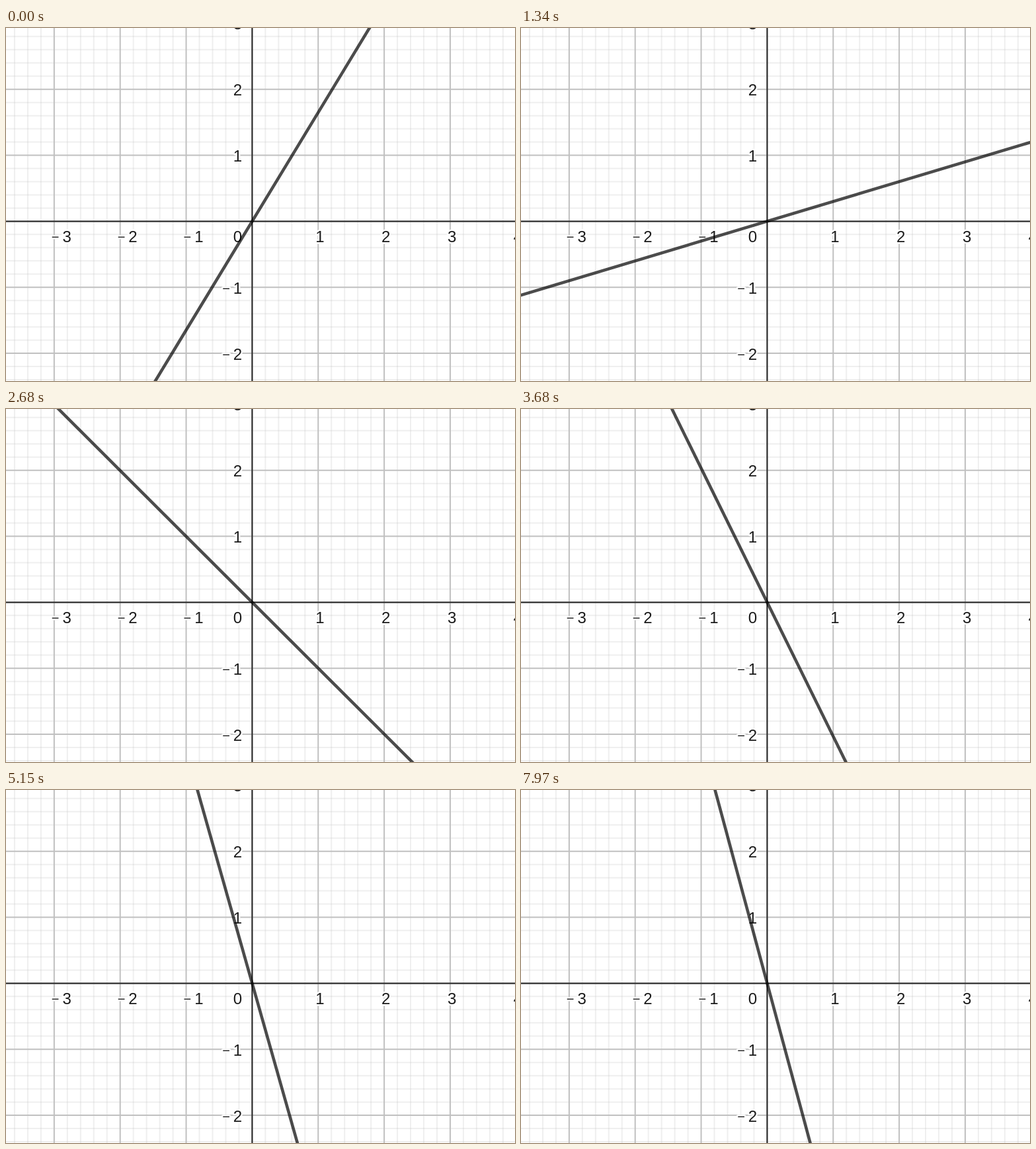
These frames come from a looping animation (770x534 px, 8 s). An HTML page:

```html
<!DOCTYPE html>
<html lang="en">
<head>
<meta charset="utf-8">
<title>Rotating line through the origin</title>
<style>
  html, body { margin: 0; width: 100%; height: 100%; overflow: hidden; background: #fff; }
  svg { display: block; width: 770px; height: 534px; }
  .minor { stroke: #c0c0c0; stroke-opacity: .25; stroke-width: 2; }
  .major { stroke: #c0c0c0; stroke-width: 2; }
  .axis { stroke: #252525; stroke-width: 2; }
  #graph { stroke: #000; stroke-opacity: .7; stroke-width: 4.6; }
  text {
    font: 24px "Liberation Sans", Arial, sans-serif;
    text-anchor: middle;
    fill: #1c1c1c;
    stroke: #fff;
    stroke-width: 5;
    stroke-linejoin: round;
    paint-order: stroke;
  }
  .sign { font-size: 20px; }
</style>
</head>
<body>
<svg viewBox="0 0 770 534">
  <g id="grid"></g>
  <g id="labels"></g>
  <line id="graph"/>
</svg>
<script>
const W = 770, H = 534, OX = 372.4, OY = 292.4, UNIT = 99.85;
const LOOP = 8000, TICK = 66.75;

// [tick, slope]; the slope falls to -5, then turns back
const SLOPES = [
  [0, 1.648], [12, 0.86], [20, 0.3], [37, -0.82], [40, -0.998], [49, -1.612],
  [55, -2.03], [62, -2.483], [75, -3.38], [77, -3.53], [87, -4.14],
  [95, -4.685], [99.7, -5], [112, -4.183], [119, -3.708]
];

const grid = document.getElementById("grid");
const labels = document.getElementById("labels");
const graph = document.getElementById("graph");

function add(parent, tag, attrs, content = "") {
  const node = document.createElementNS("http://www.w3.org/2000/svg", tag);
  for (const key in attrs) node.setAttribute(key, attrs[key]);
  node.textContent = content;
  parent.append(node);
}

const vertical = (x, cls) => add(grid, "line", { x1: x, x2: x, y1: 0, y2: H, class: cls });
const horizontal = (y, cls) => add(grid, "line", { x1: 0, x2: W, y1: y, y2: y, class: cls });

function drawGrid() {
  for (const cls of ["minor", "major"]) {
    for (let i = -20; i <= 20; i++) {
      if ((i % 5 === 0) !== (cls === "major")) continue;
      vertical(OX + i * UNIT / 5, cls);
      horizontal(OY - i * UNIT / 5, cls);
    }
  }
  vertical(OX, "axis");
  horizontal(OY, "axis");
}

function label(value, x, y) {
  if (value < 0) add(labels, "text", { x: x - 17.5, y: y - 1, class: "sign" }, "\u2212");
  add(labels, "text", { x, y }, Math.abs(value));
}

function drawLabels() {
  for (let n = -3; n <= 4; n++) {
    if (n) label(n, OX + n * UNIT + (n < 0 ? 19.3 : 2.7), 324);
  }
  for (let n = -2; n <= 3; n++) {
    if (n) label(n, 350.5, OY - n * UNIT + 9.4);
  }
  label(0, 350.5, 324);
}

function slopeAt(tick) {
  const i = Math.max(1, SLOPES.findIndex(([t]) => t >= tick));
  const [t0, m0] = SLOPES[i - 1], [t1, m1] = SLOPES[i];
  return m0 + (m1 - m0) * (tick - t0) / (t1 - t0);
}

function render(now) {
  const tick = Math.min(119, Math.floor((now % LOOP) / TICK));
  const angle = Math.atan(slopeAt(tick));
  const dx = W * Math.cos(angle), dy = W * Math.sin(angle);
  graph.setAttribute("x1", OX - dx);
  graph.setAttribute("y1", OY + dy);
  graph.setAttribute("x2", OX + dx);
  graph.setAttribute("y2", OY - dy);
}

drawGrid();
drawLabels();
const start = performance.now();
function frame() {
  render(performance.now() - start);
  requestAnimationFrame(frame);
}
frame();
</script>
</body>
</html>
```
